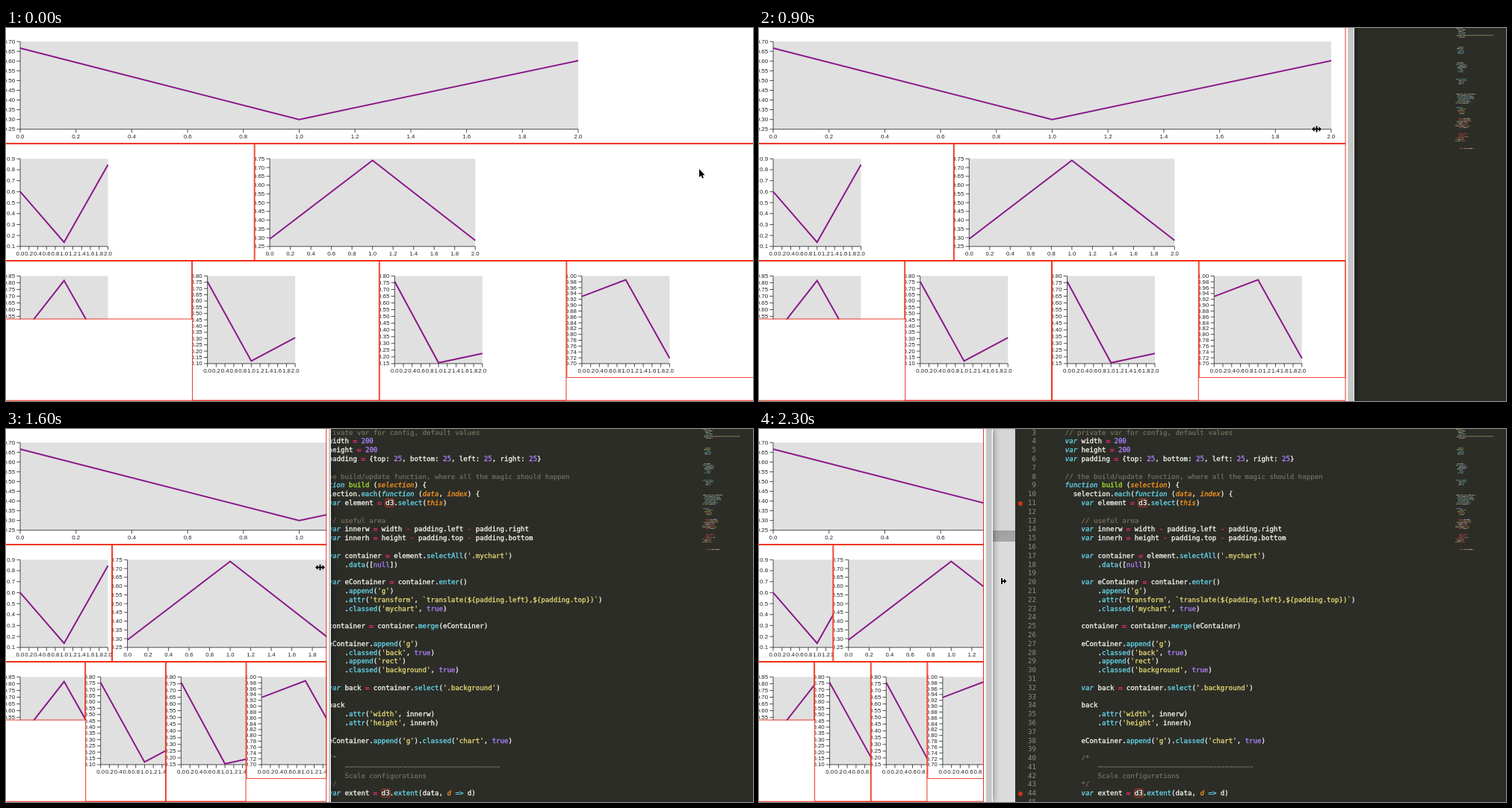
Write an HTML page that moves like this. It is 1000x500 px and loops after 3.3 s.

```html
<!DOCTYPE html>
<html>
<head>
<meta charset="utf-8">
<title>Responsive charts</title>
<style>
html, body { margin: 0; width: 100%; height: 100%; overflow: hidden; }
body { position: relative; background: linear-gradient(#d6d6d6 136px, #a0a0a0 136px, #a8a8a8 151px, #dcdcdc 151px); }
#editor, #browser { position: absolute; top: 0; height: 500px; overflow: hidden; }
#editor { left: 343px; width: 657px; background: #2c2d27; }
#browser { left: 0; background: #fff; box-shadow: 0 0 9px rgba(0, 0, 0, .5); }
svg { position: absolute; left: 0; top: 0; }
pre { position: absolute; top: -.4px; margin: 0; font: 9.1px/11.79px "DejaVu Sans Mono", monospace; color: #f8f8f2; }
#code { left: 66.7px; -webkit-text-stroke: .3px; }
#nums { left: 0; width: 28px; text-align: right; color: #8f908a; }
.com { color: #7f7a67; -webkit-text-stroke: .1px; }
.str { color: #e6db74; }
.key { color: #66d9ef; font-style: italic; }
.arg { color: #fd971f; font-style: italic; }
.num { color: #ae81ff; }
.def { color: #a6e22e; }
.fn { color: #66d9ef; }
.op { color: #f92672; -webkit-text-stroke: .5px; }
.lib { border-radius: 3px; box-shadow: 0 0 0 1px #b8341c; }
.dot { position: absolute; left: 3.5px; width: 6px; height: 6px; border-radius: 3px; background: #cc3511; }
text { font: 7.83px "Liberation Sans", Arial, sans-serif; fill: #222; }
.axis { fill: none; stroke: #222; stroke-width: .8; }
.line { fill: none; stroke: #8a1a8a; stroke-width: 2; }
.frame { fill: none; stroke: #ee2a14; stroke-width: 1.9; }
#cursor { stroke: #fff; stroke-width: 1; paint-order: stroke; }
</style>
</head>
<body>
<div id="editor">
  <pre id="nums"></pre>
  <pre id="code"></pre>
  <svg id="map" width="657" height="500"></svg>
</div>
<div id="browser"><svg id="page" width="1020" height="500"></svg></div>
<svg width="1000" height="500"><path id="cursor"/></svg>
<script>
const $ = id => document.getElementById(id);
const rect = (x, y, w, h, fill) => `<rect x="${x}" y="${y}" width="${w}" height="${h}" fill="${fill}"/>`;

// ---- editor ----
const source = `// private var for config, default values
var width = 200
var height = 200
var padding = {top: 25, bottom: 25, left: 25, right: 25}

// the build/update function, where all the magic should happen
function build (selection) {
  selection.each(function (data, index) {
    var element = d3.select(this)

    // useful area
    var innerw = width - padding.left - padding.right
    var innerh = height - padding.top - padding.bottom

    var container = element.selectAll('.mychart')
        .data([null])

    var eContainer = container.enter()
        .append('g')
        .attr('transform', \`translate(\${padding.left},\${padding.top})\`)
        .classed('mychart', true)

    container = container.merge(eContainer)

    eContainer.append('g')
        .classed('back', true)
        .append('rect')
        .classed('background', true)

    var back = container.select('.background')

    back
        .attr('width', innerw)
        .attr('height', innerh)

    eContainer.append('g').classed('chart', true)

    /*
        ${'~'.repeat(38)}
        Scale configurations
    */
    var extent = d3.extent(data, d => d)
`;
const tokens = new RegExp([
  String.raw`(?<com>\/\/.*|\/\*[^]*?\*\/)`,
  "(?<str>'[^']*'|`[^`]*`)",
  String.raw`(?<key>\b(?:var|function)\b|=>)`,
  String.raw`(?<arg>\bselection(?=\))|\bdata(?=, index)|\bindex|\bthis|\bd(?= =))`,
  String.raw`(?<num>\b(?:\d+|true|null)\b)`,
  String.raw`(?<def>\bbuild\b)`,
  String.raw`(?<lib>\bd3\b)`,
  String.raw`(?<fn>\w+(?=\())`,
  '(?<op>[=-])'
].join('|'), 'g');
$('code').innerHTML = source.replace(tokens, (word, ...rest) => {
  const groups = rest.pop();
  const kind = Object.keys(groups).find(k => groups[k] !== undefined);
  return `<span class="${kind}">${word.replace('>', '&gt;')}</span>`;
});
$('nums').textContent = Array.from({length: 43}, (_, i) => i + 3).join('\n');
for (const n of [11, 44]) {
  $('editor').insertAdjacentHTML('beforeend', `<i class="dot" style="top:${2.7 + (n - 3) * 11.79}px"></i>`);
}

// Minimap: seeded blocks of short coloured dashes, red towards the end
let seed = 7;
const random = () => (seed = seed * 16807 % 2147483647) / 2147483647;
let marks = rect(602, 9.4, 38, .9, '#8a8560');
for (let y = 0; y < 162; y += 4 + random() * 8) {
  const reach = 12 + random() * 22;
  for (let rows = 3 + random() * 4; rows > 0 && y < 162; rows--, y += 2) {
    const tints = ['#aaa', '#96905a', y > 112 ? '#a8483c' : '#5d9097'];
    const end = 592 + reach * (.5 + random() / 2);
    for (let x = 589 + random() * 6, w; x < end; x += w + .8) {
      w = 1.5 + random() * 5;
      marks += rect(x, y, Math.min(w, end - x), .9, tints[random() * 3 | 0]);
    }
  }
}
$('map').innerHTML = marks;

// ---- charts ----
const H = 117.5;
const seq = (n, f) => Array.from({length: n + 1}, (_, i) => f(i)).join('');

// About ten ticks, each 1, 2 or 5 times a power of ten
function tickStep(span) {
  const power = 10 ** Math.floor(Math.log10(span / 10));
  const ratio = span / 10 / power;
  return power * (ratio >= 50 ** .5 ? 10 : ratio >= 10 ** .5 ? 5 : ratio >= 2 ** .5 ? 2 : 1);
}

function chart(w, values) {
  const min = Math.min(...values), max = Math.max(...values);
  const step = tickStep(max - min);
  const lo = Math.floor(min / step) * step, hi = Math.ceil(max / step) * step;
  const rows = Math.round((hi - lo) / step);
  const digits = step < .09 ? 2 : 1;
  const yTicks = seq(rows, i => `M-4.7 ${i * H / rows}H0`);
  const xTicks = seq(10, i => `M${i * w / 10} ${H}v4.7`);
  const yText = seq(rows, i =>
    `<text x="-7" y="${i * H / rows + 2.5}" text-anchor="end">${(hi - i * step).toFixed(digits)}</text>`);
  const xText = seq(10, i =>
    `<text x="${i * w / 10}" y="${H + 12.6}" text-anchor="middle">${(i / 5).toFixed(1)}</text>`);
  const points = values.map((v, i) => `${i * w / 2},${H * (hi - v) / (hi - lo)}`).join(' ');
  return `<g transform="translate(20.5 20.4)">${rect(0, 0, w, H, '#e0e0e0')}
    <path class="axis" d="M0 0V${H}H${w}${yTicks}${xTicks}"/>${yText}${xText}
    <polyline class="line" points="${points}"/></g>`;
}

// Cells: row, left and right as shares of the width, height in rows, content
const cells = [
  [0, 0, 1, 1, chart(747, [.666, .3, .602])],
  [1, 0, 1 / 3, 1, chart(H, [.6, .138, .846])],
  [1, 1 / 3, 1, 1, chart(275, [.293, .741, .284])],
  [2, 0, 1 / 4, .5, chart(H, [.4, .816, .24])],
  [2, 1 / 4, 1 / 2, 1.195, chart(H, [.755, .121, .307])],
  [2, 1 / 2, 3 / 4, 1.195, chart(H, [.759, .156, .226])],
  [2, 3 / 4, 1, 1, chart(H, [.93, .987, .718])],
  [2, 0, 1, 1.195, '']
];
const rowH = 157.1;
$('page').innerHTML = '<rect id="thumb" height="500" fill="#c6c6c6"/>' + cells.map(([row, , , h, body]) =>
  `<svg class="cell" y="${row * rowH - 2.2}" height="${h * rowH}">${body}<rect class="frame" width="100%" height="100%"/></svg>`
).join('');
const boxes = document.querySelectorAll('.cell');

// ---- motion ----
const arrow = 'M0 0V11L2.5 8.8 4.2 12.6 6 11.8 4.3 8.2H7.5Z';
const toRight = 'M-1-4H1V-1H3V-3.5L6.5 0 3 3.5V1H1V4H-1Z';
const bothWays = 'M-1-4H1V-1H3V-3.5L6.5 0 3 3.5V1H1V4H-1V1H-3V3.5L-6.5 0-3-3.5V-1H-1Z';

// Time, content right, window right, cursor x, cursor y
const keys = [
  [0, 1001, 1012, 928, 189],
  [300, 1001, 1012, 1004, 134],
  [500, 965.5, 970, 949.5, 132.5],
  [600, 954, 966, 899, 133],
  [900, 785.5, 797, 746.5, 135.5],
  [1100, 693.5, 675, 648.5, 144.5],
  [1400, 520.5, 522.5, 503.5, 175.5],
  [1800, 338, 347, 337.5, 195.5],
  [2100, 301, 313, 325, 204]
];

function pose(t) {
  const i = Math.max(1, keys.findIndex(k => k[0] >= t));
  const a = keys[i - 1], b = keys[i], p = (t - a[0]) / (b[0] - a[0]);
  return a.map((v, j) => v + (b[j] - v) * p);
}

function draw(now) {
  // The screen refreshes in 100 ms steps
  const t = Math.min(2100, Math.floor(now % 3300 / 100) * 100);
  const [, right, edge, cx, cy] = pose(t);
  const left = -1.5, width = right - left;
  cells.forEach(([, from, to], i) => {
    boxes[i].setAttribute('x', left + width * from);
    boxes[i].setAttribute('width', width * (to - from));
  });
  $('browser').style.width = edge + 'px';
  $('thumb').setAttribute('x', right + 2.8);
  $('thumb').setAttribute('width', Math.max(0, Math.min(8, edge - right - 3.3)));
  $('cursor').setAttribute('transform', `translate(${cx} ${cy})`);
  $('cursor').setAttribute('d', t < 300 ? arrow : t < 2000 ? bothWays : toRight);
  requestAnimationFrame(draw);
}
requestAnimationFrame(draw);
</script>
</body>
</html>
```
